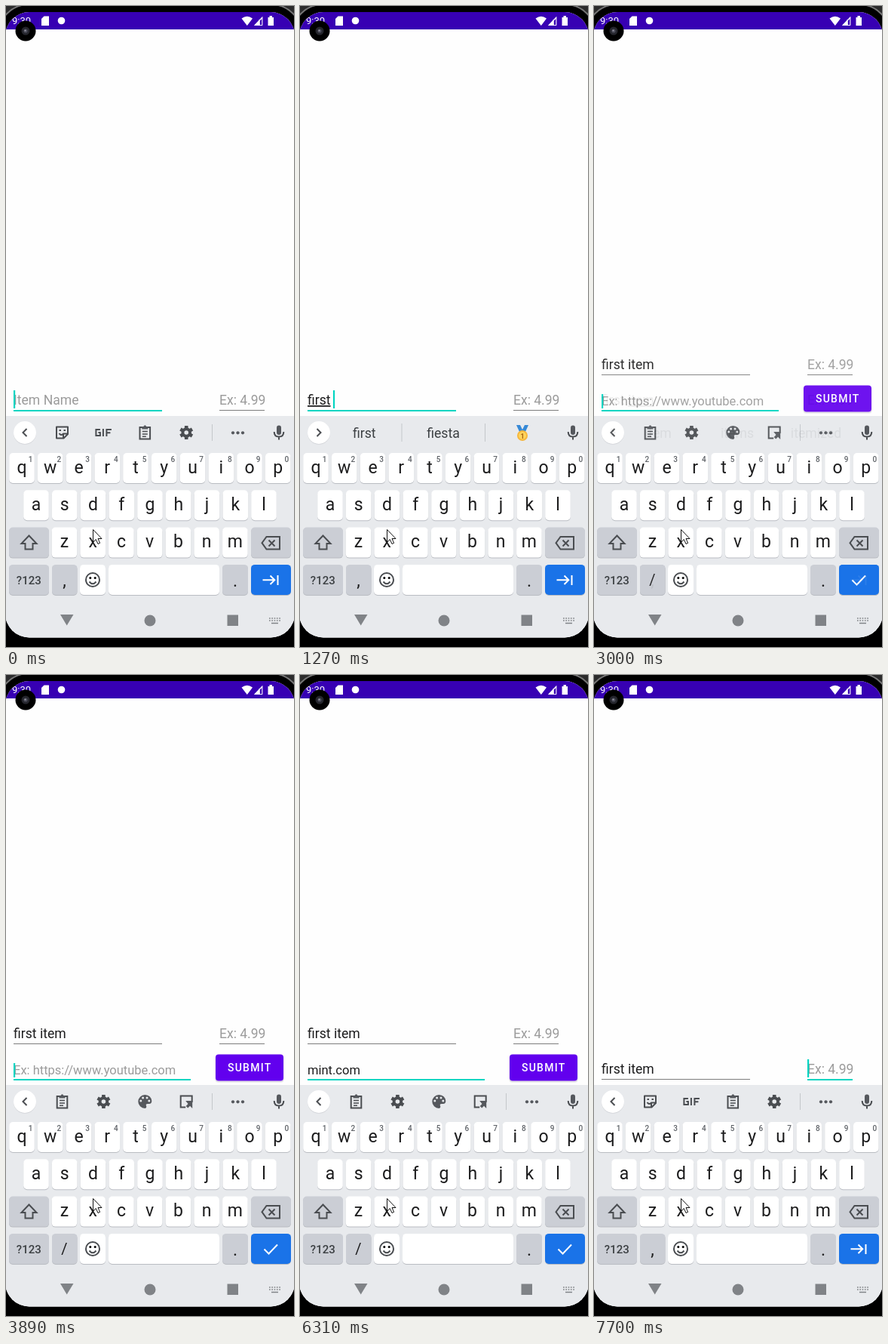
An HTML page that plays this animation: 382 by 849 pixels, repeating every 8 s.

```html
<!DOCTYPE html>
<html lang="en">
<head>
<meta charset="utf-8">
<title>Item form</title>
<style>
html, body { margin: 0; width: 100%; height: 100%; overflow: hidden; background: #000; }
svg { display: block; width: 382px; height: 849px; font-family: Roboto, sans-serif; }
text { white-space: pre; }
.mid { text-anchor: middle; }
.line { fill: none; stroke: #4a4d51; stroke-width: 2; }
.icon { fill: #55585d; }
.u { text-decoration: underline; }
</style>
</head>
<body>
<svg viewBox="0 0 382 849">
  <defs>
    <clipPath id="screen"><rect x="-1" y="8" width="384" height="828.5" rx="32"/></clipPath>
  </defs>
  <rect width="382" height="849" fill="#2c2c2c"/>
  <rect x="-10" y="-2" width="402" height="900" rx="40" stroke="#777" stroke-width="2"/>
  <g clip-path="url(#screen)">
    <rect width="382" height="849" fill="#fefefe"/>
    <rect width="382" height="31" fill="#3700b3"/>
    <g fill="#fff">
      <text x="8" y="24" font-size="13">9:30</text>
      <path d="M50.500 13.500H57V26H47V17Z"/>
      <circle cx="73.500" cy="19.500" r="4.800"/>
      <path d="M312.500 16.500Q319.800 11 327 16.500L319.800 26ZM347.500 15H349.500V13H353V15H355V26H347.500Z"/>
      <path d="M336 18V25.500H329.500L340 14.500V25.500H336" stroke="#fff" stroke-width=".8"/>
      <path d="M336.800 19.500L339.300 17V25H336.800Z" fill="#3700b3"/>
    </g>
    <rect y="543" width="382" height="306" fill="#e8eaed"/>
    <g id="keys"></g>
    <g id="before"></g>
    <g id="now"></g>
    <g fill="#808387">
      <path d="M72 806H89.500L80.700 820.500Z"/>
      <circle cx="191" cy="814" r="7.500"/>
      <rect x="293.500" y="806.500" width="14.500" height="14.500"/>
      <path d="M349 811H364M349 814H364" stroke="#808387" stroke-width="1.500" stroke-dasharray="1.700 1.600"/>
      <path d="M352 817.500H361" stroke="#808387" stroke-width="1.500"/>
    </g>
  </g>
  <circle cx="26" cy="33" r="13.500"/>
  <circle cx="26" cy="33" r="5.500" fill="#25262d"/>
  <circle cx="26" cy="33" r="2.600" fill="#4b4c59"/>
  <circle cx="25.500" cy="32.500" r="1" fill="#a5a5b0"/>
  <path d="M115.500 693.500V710L119.300 706.500L122 712.500L124.600 711.300L122 705.500H127Z" fill="#fff" stroke="#111"/>
</svg>
<script>
const $ = id => document.getElementById(id);
const GREY = '#cbced5', TEAL = '#03d5c2';
const rect = (x, y, w, h, fill, r = 0) =>
  `<rect x="${x}" y="${y}" width="${w}" height="${h}" rx="${r}" fill="${fill}"/>`;
const text = (x, y, size, s, fill = '#1c1c1d', more = '') =>
  `<text x="${x}" y="${y}" font-size="${size}" fill="${fill}" ${more}>${s}</text>`;
const label = (x, y, size, s, fill, more = '') => text(x, y, size, s, fill, 'class="mid" ' + more);
const line = (d, more = '') => `<path class="line" d="${d}" ${more}/>`;
const at = (x, y, s) => `<g transform="translate(${x} ${y})">${s}</g>`;
const rowY = r => 592 + 49.3 * r;
const key = (x, r, w, fill = '#fff') =>
  rect(x, rowY(r) + 1, w, 40, '#b9bcc2', 5) + rect(x, rowY(r), w, 40, fill, 5);

// Parts of the keyboard that never change
function keyboard() {
  let s = '';
  ['qwertyuiop', 'asdfghjkl', 'zxcvbnm'].forEach((row, r) => {
    [...row].forEach((c, i) => {
      const x = [21, 40, 77.4][r] + 37.75 * i;
      s += key(x - 16.8, r, 33.6) + label(x, rowY(r) + 26.5, 23, c);
      if (!r) s += label(x + 11.5, 603.5, 10, (i + 1) % 10, '#5f6368', 'font-weight="500"');
    });
  });
  s += key(4, 2, 53, GREY) + line('M30.500 701.500L40.500 712H35.500V719.500H25.500V712H20.500Z');
  s += key(325, 2, 53, GREY) + line('M345.500 703H363V719.500H345.500L339.500 711.200ZM348.500 707.500L356.500 715.500M356.500 707.500L348.500 715.500');
  s += key(4, 3, 53, GREY) + label(30.3, 766, 15, '?123', '#3c4043', 'font-weight="500"');
  s += key(98, 3, 34) + line('M110.500 762.500Q115 768 119.500 762.500') +
    '<circle class="line" cx="115" cy="760" r="9"/><circle cx="111.800" cy="757.500" r="1.500"/><circle cx="118.200" cy="757.500" r="1.500"/>';
  s += key(136, 3, 147) + key(287, 3, 34, GREY) + label(304, 769, 23, '.');
  s += at(362, 565, '<rect class="icon" x="-3" y="-9.500" width="6" height="12.500" rx="3"/>' +
    line('M-6.300 -1Q-6.300 5.500 0 5.500T6.300 -1M0 5.500V9.500'));
  return s;
}

const icons = {
  sticker: line('M-7.500 -7.500H7.500V2L2 7.500H-7.500ZM7.500 1.500H1.500V7.500', 'stroke-linejoin="round"') +
    line('M-4 1Q-1.500 4.500 1 2M-4 -3H-1.500M2 -3H4.500'),
  gif: line('M-4.500 -4H-10V4H-4.500V0H-7M-.5 -5V5M4 5V-4H10.500M4 .3H9', 'stroke-width="2.300"'),
  clip: line('M-6.800 -7H6.800V8.500H-6.800Z') + line('M-3.500 -1.500H3.500M-3.500 2H3.500M-3.500 5.300H1.500', 'style="stroke-width:1.600"') +
    '<path class="icon" d="M-4 -8H-2Q0 -11.500 2 -8H4V-4.500H-4Z"/>',
  gear: '<circle class="line" r="4.800" style="stroke-width:4"/>' + [0, 60, 120].map(a =>
    `<path class="line" style="stroke-width:4.600" d="M0 -9V-5M0 5V9" transform="rotate(${a})"/>`).join(''),
  palette: '<path class="icon" d="M0 -9A9 9 0 1 0 0 9Q3 8 1.500 5Q1 3 3.500 3H5.500Q9 3 9 -1Q8 -8.500 0 -9"/>' +
    [[-5.5, -1], [-2.7, -5], [2.7, -5], [5.5, -1]].map(p => `<circle cx="${p[0]}" cy="${p[1]}" r="1.500" fill="#e8eaed"/>`).join(''),
  resize: line('M-1 7.500H-7.500V-7.500H7.500V1') + '<path class="icon" d="M-1 -1H8V9L4.800 5.800L2 8.500L-.5 6L2.300 3Z"/>'
};
const medal = '<path d="M-8 -10H-3L0 -4L3 -10H8L3 1H-3Z" fill="#3689d6"/><circle cy="4" r="7" fill="#f6b73c"/><circle cy="4" r="5" fill="#ffd45c"/>' +
  label(0, 7.5, 9, '1', '#a86410', 'font-weight="700"');

function toolbar(s) {
  const sug = s.sug;
  let out = rect(0, 543, 345, 46, '#e8eaed') + '<circle cx="25" cy="565.800" r="15" fill="#d3d5d9"/><circle cx="25" cy="565" r="15" fill="#fff"/>' +
    line(sug ? 'M22.500 560L27.500 565L22.500 570' : 'M27.500 560L22.500 565L27.500 570');
  if (sug) {
    out += rect(134.5, 553, 1, 24, '#c4c7cb') + rect(245, 553, 1, 24, '#c4c7cb');
    sug.split(' ').forEach((w, i) => {
      const x = [85.3, 190, 294.5][i];
      out += w === '*' ? at(295, 565, medal) : label(x, 572, 17.7, w, '#3c4043');
    });
  } else {
    const set = s.two ? ['clip', 'gear', 'palette', 'resize'] : ['sticker', 'gif', 'clip', 'gear'];
    set.forEach((n, i) => out += at(74.5 + 54.9 * i, 565, icons[n]));
    out += rect(273, 554, 1, 22, '#c4c7cb');
    for (const x of [301, 307.5, 314]) out += `<circle class="icon" cx="${x}" cy="565.300" r="2.100"/>`;
  }
  return out;
}

const pen = document.createElement('canvas').getContext('2d');

// Bars in a value enclose the underlined word
function field(x, y, w, size, value, hint, focus, caret, top) {
  const [pre, word = '', post = ''] = value.split('|');
  let out = value
    ? text(x, y, size, `${pre}<tspan class="u">${word}</tspan>${post}`)
    : text(x, y, size, hint, '#9b9b9b');
  out += focus ? rect(x, 535, w, 2, TEAL) : rect(x, y + 7, w, 1, '#7d7d7d');
  if (focus && caret) {
    pen.font = size + 'px Roboto, sans-serif';
    const cx = x + Math.max(0, pen.measureText(pre + word + post).width - 1);
    out += rect(cx, top, 2.2, 533 - top, TEAL);
  }
  return out;
}

function scene(s) {
  const y = s.two ? 481 : 528;
  let out = rect(0, 455, 382, 88, '#fefefe');
  out += field(10, y, 197, 17.6, s.name, 'Item Name', s.focus === 'name', s.caret, 509);
  out += field(283, y, 60, 17.5, '', 'Ex: 4.99', s.focus === 'price', s.caret, 509);
  if (s.two) {
    out += field(10, 528.7, 235, 16.5, s.url, 'Ex: https://www.youtube.com', true, s.caret, 514);
    out += rect(277.5, 503.5, 91, 36, '#e0dfe4', 4) + rect(278, 502.5, 90, 35, '#6200ee', 4) +
      text(294, 525, 14, 'SUBMIT', '#fff', 'font-weight="500" letter-spacing="1.250"');
  }
  out += toolbar(s) + key(61, 3, 33.5, GREY) + label(77.5, s.two ? 767 : 769, s.two ? 20 : 23, s.two ? '/' : ',');
  out += key(325, 3, 53, '#1a73e8') + line(
    s.two ? 'M342.500 760.500L348.500 766.500L360 754.500' : 'M340.500 760.300H356M350.500 754.500L356.300 760.300L350.500 766M360.500 754V767',
    'style="stroke:#fff"');
  return out;
}

// [time, changes]; mix fades from the last layout to the new one
const steps = [
  [0, { name: '', url: '', focus: 'name', caret: 1, sug: '', two: 0, mix: 1 }],
  [280, { name: '|f|' }],
  [430, { name: '|fi|', sug: 'fi find first' }],
  [550, { name: '|fir|', sug: 'fir first fire' }],
  [700, { name: '|f|', sug: 'f for first' }],
  [820, { name: '', sug: '' }],
  [970, { name: '|f|', sug: 'f for first' }],
  [1120, { name: '|fir|', sug: 'fir first fire' }],
  [1270, { name: '|first| ', sug: 'first fiesta *' }],
  [1540, { name: 'first ', sug: 'time of in' }],
  [1660, { name: 'first |i|', sug: 'i is in' }],
  [1780, { name: 'first |it|', sug: 'it its is' }],
  [1930, { name: 'first |ite|', sug: 'ite item items' }],
  [2180, { name: 'first |item|', sug: 'item items itemized' }],
  [2610, { caret: 0 }],
  [2880, { name: 'first item', focus: 'url', two: 1, sug: '', caret: 1, mix: .7 }],
  [3000, { mix: .92 }],
  [3120, { mix: 1 }],
  [3370, { caret: 0 }],
  [3890, { caret: 1 }],
  [4170, { url: '|m|', sug: 'm my me' }],
  [4290, { url: '|mi|', sug: 'mi mix mine' }],
  [4440, { url: '|min|', sug: 'min mine mint' }],
  [4560, { url: '|mint|', sug: 'mint mints PlumWader' }],
  [4990, { caret: 0 }],
  [5390, { url: '|mint|.', caret: 1 }],
  [5540, { url: 'mint.c', sug: '' }],
  [5660, { url: 'mint.co' }],
  [5780, { url: 'mint.com' }],
  [6310, { caret: 0 }],
  [6590, { focus: 'price', two: 0, caret: 1, mix: .7 }],
  [6740, { mix: .92 }],
  [6890, { mix: 1 }],
  [7170, { caret: 0 }],
  [7700, { caret: 1 }]
];
let state = {}, old;
const states = steps.map(([t, change]) => {
  if ('two' in change) old = state;
  state = { ...state, ...change, t, old };
  return state;
});

let shown;
function frame(now) {
  const t = now % 8000;
  const s = states.findLast(s => s.t <= t);
  if (s !== shown) {
    shown = s;
    $('before').innerHTML = s.mix < 1 ? scene(s.old) : '';
    $('now').innerHTML = scene(s);
    $('now').setAttribute('opacity', s.mix);
  }
  requestAnimationFrame(frame);
}
$('keys').innerHTML = keyboard();
const start = performance.now();
const tick = () => Math.max(0, performance.now() - start);
const loop = () => { frame(tick()); };
const raf = window.requestAnimationFrame.bind(window);
window.requestAnimationFrame = () => raf(loop);
loop();
</script>
</body>
</html>
```
